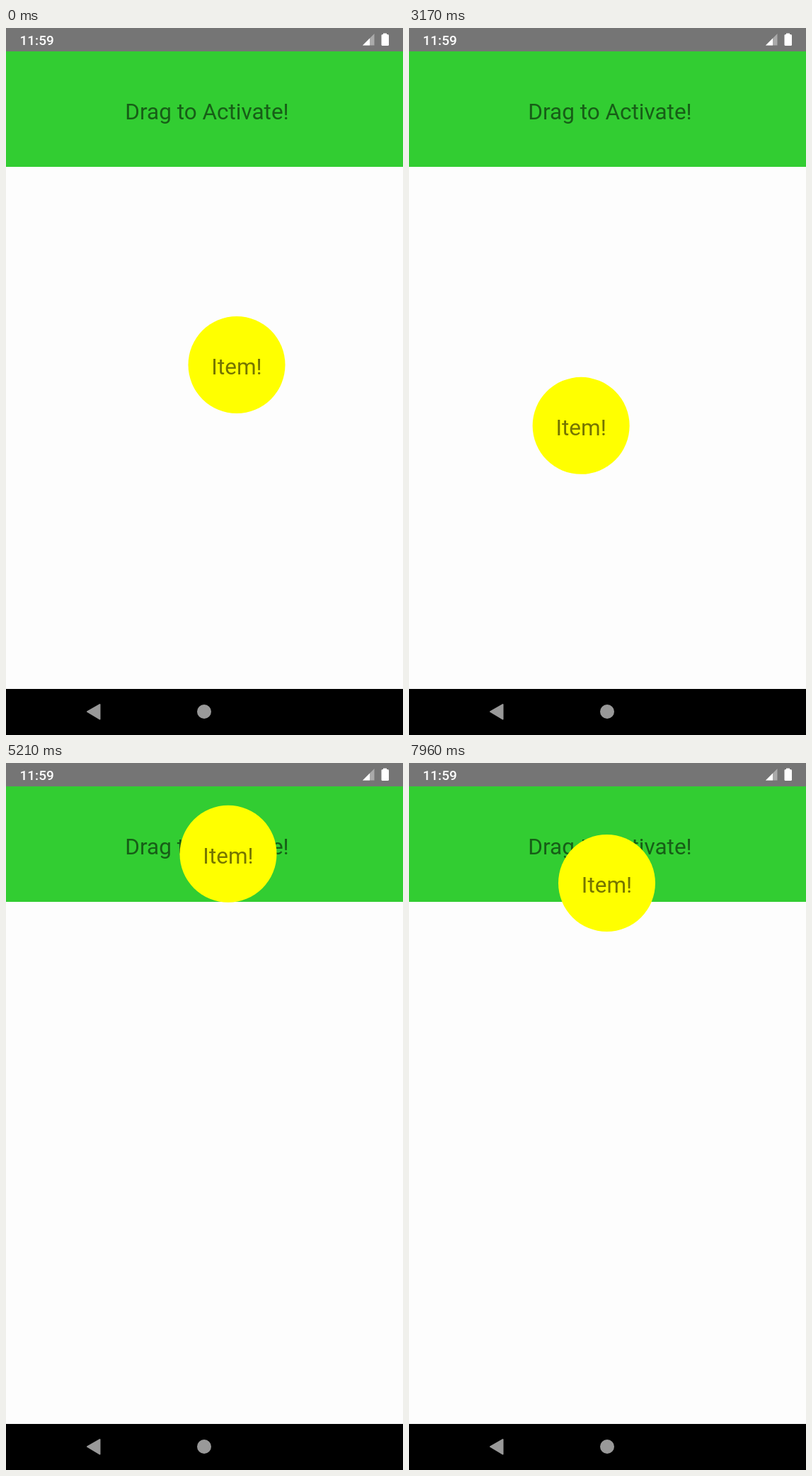
Animation of 561x998 px, one loop 8 s. Source, as an HTML page:

```html
<!DOCTYPE html>
<html lang="en">
<head>
<meta charset="utf-8">
<title>Drag to Activate</title>
<style>
  html, body { margin: 0; width: 100%; height: 100%; overflow: hidden; }
  svg { display: block; width: 561px; height: 998px; }
  text { font-family: Roboto, sans-serif; }
  .label { font-size: 31.5px; fill: #000; fill-opacity: .54; text-anchor: middle; }
</style>
</head>
<body>
<svg viewBox="0 0 561 998">
  <rect width="561" height="998" fill="#fdfdfd"/>
  <rect id="banner" y="33" width="561" height="163"/>
  <text class="label" x="284" y="128.5">Drag to Activate!</text>

  <rect width="561" height="33" fill="#757575"/>
  <text x="19.5" y="24" font-size="19" font-weight="500" fill="#fff">11:59</text>
  <path d="M504 24.5L520.5 8V24.5Z" fill="#aaa"/>
  <path d="M504 24.5L514 14.5V24.5Z" fill="#fff"/>
  <rect x="533" y="7.5" width="5" height="3" fill="#fff"/>
  <rect x="530.5" y="9" width="10.5" height="16" rx="1.5" fill="#fff"/>

  <rect y="933" width="561" height="65" fill="#000"/>
  <path d="M115 965L132.5 955V975.5Z" fill="#999" stroke="#999" stroke-width="2" stroke-linejoin="round"/>
  <circle cx="280" cy="965" r="10" fill="#999"/>

  <g id="item">
    <circle r="68.5" fill="#ff0"/>
    <text class="label" y="13.5">Item!</text>
  </g>
</svg>
<script>
const LOOP = 8000, BANNER_BOTTOM = 196;

// Points the finger drags through; at a rest it pauses until `until`.
const stops = [
  { t: 0, x: 326, y: 475.5, until: 0 },
  { t: 1840, x: 168.5, y: 608.5, until: 3000 },
  { t: 3170, x: 243, y: 561.5 },
  { t: 4170, x: 327, y: 451 },
  { t: 5210, x: 314, y: 128.5 },
  { t: 5590, x: 315.5, y: 119.5, until: 6040 },
  { t: 6340, x: 224.5, y: 225.5 },
  { t: 6790, x: 288, y: 337, until: 7250 },
  { t: 7960, x: 279.5, y: 169.5, until: LOOP }
];
const banner = document.getElementById('banner');
const item = document.getElementById('item');
const leaveTime = stop => stop.until ?? stop.t;

// Zero at rests, otherwise the mean speed between the neighbours.
function speed(i, axis) {
  if ('until' in stops[i]) return 0;
  const a = stops[i - 1], b = stops[i + 1];
  return (b[axis] - a[axis]) / (b.t - leaveTime(a));
}

function position(t, axis) {
  const i = stops.findLastIndex(stop => stop.t <= t);
  const a = stops[i], b = stops[i + 1], start = leaveTime(a);
  if (!b || t <= start) return a[axis];
  const span = b.t - start, u = (t - start) / span, v = 1 - u;
  return a[axis] + (b[axis] - a[axis]) * u * u * (3 - 2 * u)
    + span * u * v * (v * speed(i, axis) - u * speed(i + 1, axis));
}

function draw() {
  const t = performance.now() % LOOP, x = position(t, 'x'), y = position(t, 'y');
  item.setAttribute('transform', `translate(${x} ${y})`);
  // Leaving the banner turns it red until the item returns.
  const left = t > 6040 && y > BANNER_BOTTOM;
  banner.setAttribute('fill', left ? '#f00' : '#32cd32');
  requestAnimationFrame(draw);
}
draw();
</script>
</body>
</html>
```
